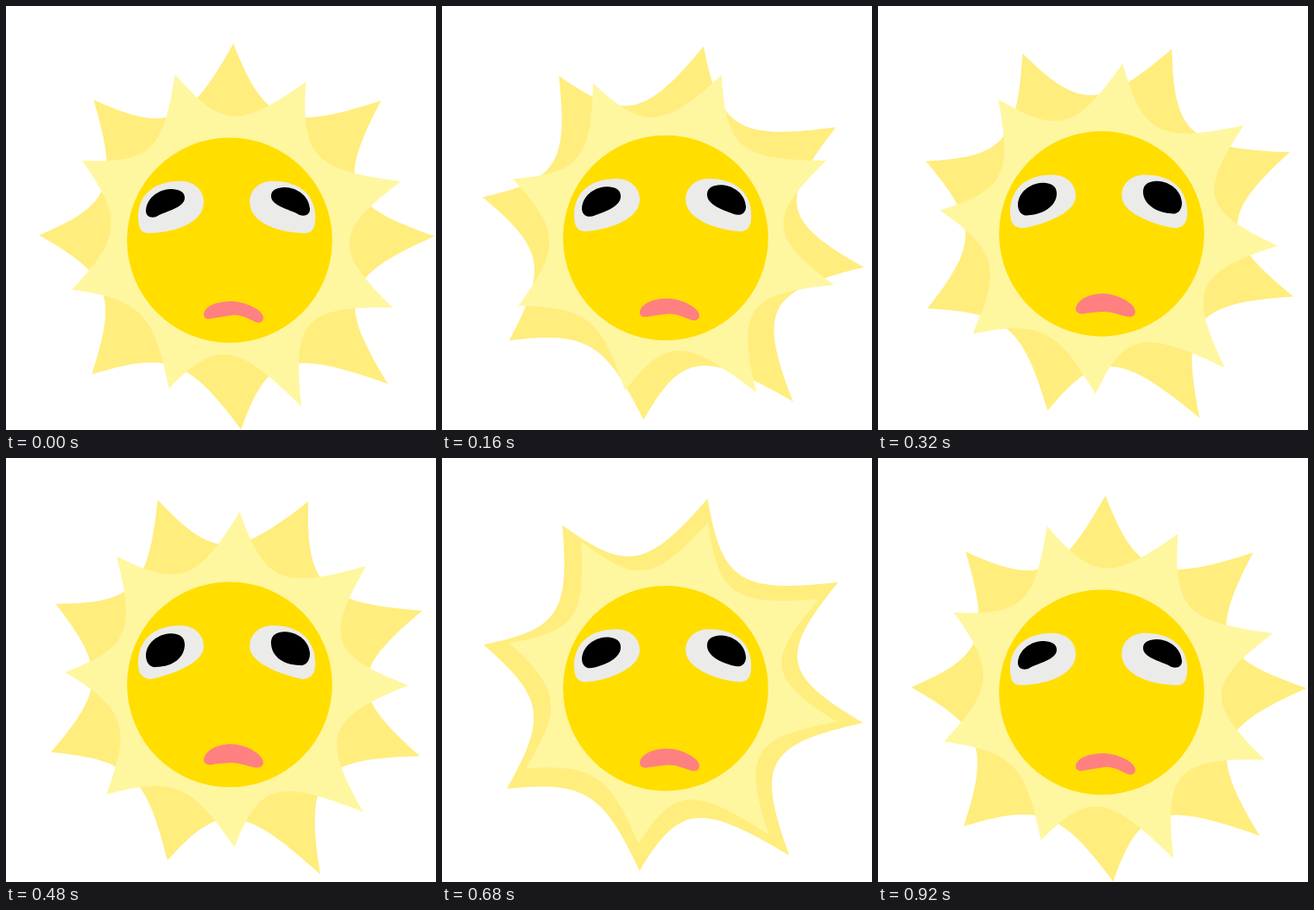
An HTML page with a canvas that plays this animation: 498x491 px, repeating every 0.96 s.

```html
<!DOCTYPE html>
<html lang="en">
<head>
<meta charset="utf-8">
<title>Sun</title>
<style>
  html, body { margin: 0; height: 100%; overflow: hidden; background: #fff; }
  canvas { display: block; }
</style>
</head>
<body>
<canvas id="stage" width="498" height="491"></canvas>
<script>
const ctx = document.getElementById('stage').getContext('2d');
const FRAME = 40, FRAMES = 24, PEAK = 11, LAST = 23, LIFT = 9;
const rad = degrees => degrees * Math.PI / 180;

// Ray tips around the origin; both layers of rays share this outline.
const tips = [[-5, -225], [166, -159], [228, -2], [174, 169],
              [4, 222], [-169, 158], [-230, -3], [-167, -160]];
const star = makeStar(159, -9, 3, 0.07);

// Each edge is one cubic whose middle touches a circle around the face.
function makeStar(radius, cx, cy, roundness) {
  const path = new Path2D();
  path.moveTo(...tips[0]);
  tips.forEach(([ax, ay], i) => {
    const [bx, by] = tips[(i + 1) % tips.length];
    const angle = Math.atan2(ay + by, ax + bx);
    const mx = (8 * (cx + radius * Math.cos(angle)) - ax - bx) / 6;
    const my = (8 * (cy + radius * Math.sin(angle)) - ay - by) / 6;
    const dx = (bx - ax) * roundness, dy = (by - ay) * roundness;
    path.bezierCurveTo(mx - dx, my - dy, mx + dx, my + dy, bx, by);
  });
  return path;
}

function fill(path, color) {
  ctx.fillStyle = color;
  ctx.fill(path);
}

// Points travel straight from the start pose to the turned pose.
function drawRays(color, x, y, scale, start, turn, p) {
  const along = 1 - p + p * Math.cos(rad(turn)), across = p * Math.sin(rad(turn));
  ctx.save();
  ctx.translate(x, y - LIFT * p);
  ctx.rotate(rad(start));
  ctx.scale(scale, scale);
  ctx.transform(along, across, -across, along, 0, 0);
  fill(star, color);
  ctx.restore();
}

// Fills a path and its reflection about the line x = axis.
function fillPair(path, color, axis, raise) {
  fill(path, color);
  ctx.save();
  ctx.transform(-1, 0, 0, 1, 2 * axis, -raise);
  fill(path, color);
  ctx.restore();
}

// The eyes and mouth open wider as p grows.
function drawFace(p) {
  const face = new Path2D();
  face.arc(259, 271.2, 118.8, 0, 2 * Math.PI);
  const eye = new Path2D(`M229 227C229 211 215 201 198 203
    C169 204 153 221 153 ${244 + 3 * p}C153 258 157 264 167 ${263 + 2 * p}
    C${200 - 18 * p} 262 229 249 229 227Z`);
  const pupil = new Path2D(`M207 ${222 + 3 * p}C207 214 198 212 190 212
    C175 213 163 223 162 237C162 ${244 + 3 * p} 168 ${246 + 6 * p} 174 ${244 + 7 * p}
    C${183 + 12 * p} ${238 + 13 * p} 207 ${234 + 5 * p} 207 ${222 + 3 * p}Z`);
  const mouth = new Path2D(`M229 ${357 + 2 * p}C230 347 245 ${342 - 2 * p} 261 ${342 - 2 * p}
    S298 352 298 361C298 367 292 368 287 ${365 + 2 * p}
    C277 ${360 + 5 * p} 269 ${357 + 5 * p} 262 ${358 + 4 * p}
    S244 ${361 + 2 * p} 238 ${362 + 2 * p}S229 361 229 ${357 + 2 * p}Z`);

  ctx.save();
  ctx.translate(0, -LIFT * p);
  fill(face, '#ffde00');
  fillPair(eye, '#ebebea', 255.6, 0);
  fillPair(pupil, '#000', 257, 2);
  fill(mouth, '#ff8080');
  ctx.restore();
}

const smooth = u => u * u * (3 - 2 * u);
const fastStart = u => u + u * u - u * u * u;

function draw(frame) {
  const rising = frame < PEAK;
  const u = rising ? frame / PEAK : (LAST - frame) / (LAST - PEAK);
  const p = smooth(u);

  ctx.clearRect(0, 0, 498, 491);
  drawRays('#ffed7d', 268.4, 268.6, 1, 0, 23, rising ? fastStart(u) : p);
  drawRays('#fff6a0', 268, 266.6, 0.87, 25.2, -23.6, p);
  drawFace(p);
}

const start = performance.now();
function tick() {
  draw(Math.floor((performance.now() - start) / FRAME) % FRAMES);
  requestAnimationFrame(tick);
}
tick();
</script>
</body>
</html>
```
